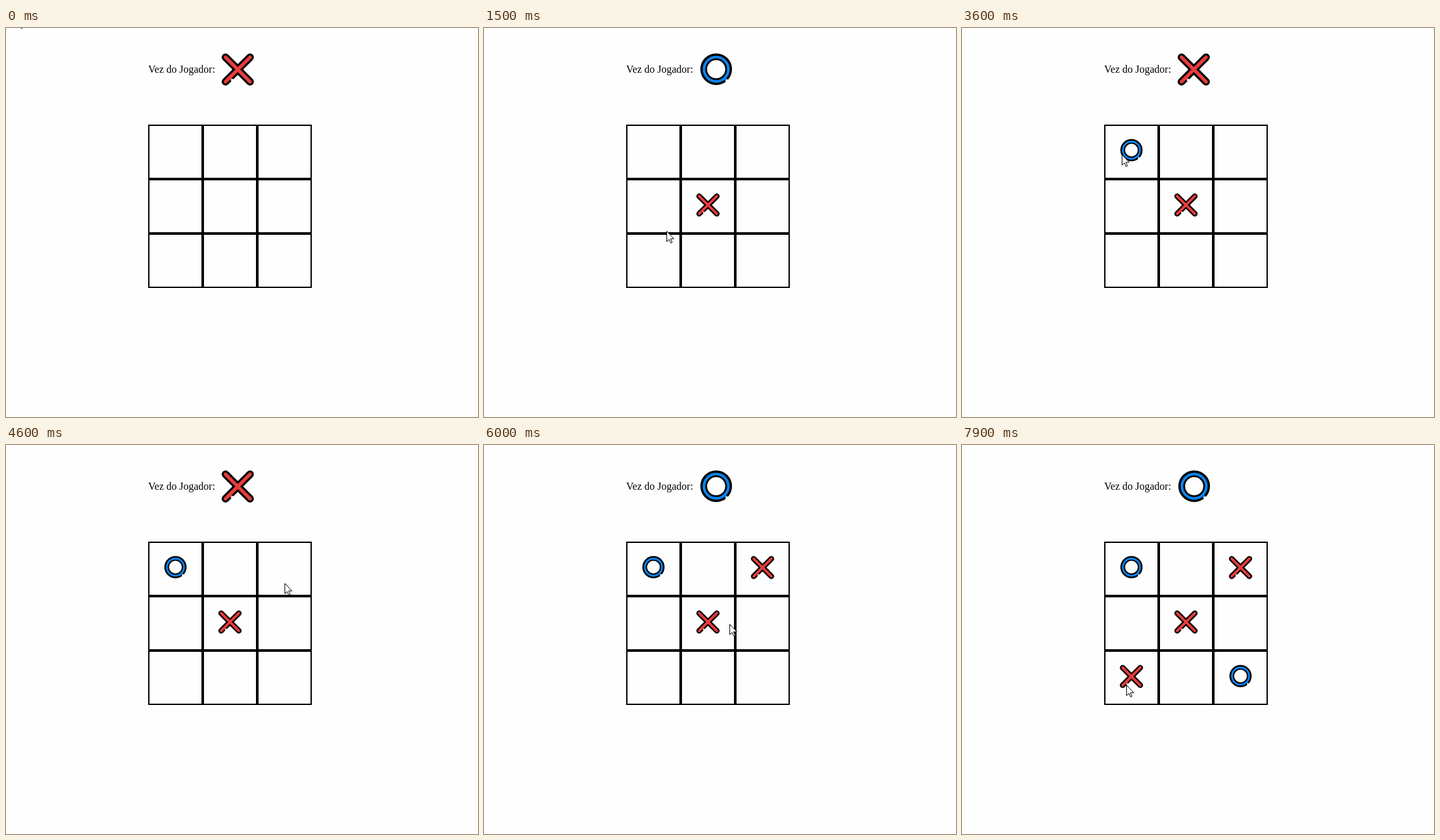
An HTML page with a canvas for the animation above (8000 ms loop, 727 by 600 pixels).

```html
<!DOCTYPE html>
<html lang="pt">
<head>
<meta charset="utf-8">
<title>Jogo da velha</title>
<style>
html, body { margin: 0; width: 100%; height: 100%; overflow: hidden; background: #fefefe; }
p { position: absolute; left: 219px; top: 55px; margin: 0; white-space: nowrap;
    font: 16px/18px "Liberation Serif", "Times New Roman", serif; color: #000; }
canvas { position: absolute; left: 0; top: 0; }
</style>
</head>
<body>
<p>Vez do Jogador:</p>
<canvas id="stage" width="727" height="600"></canvas>
<script>
const ctx = document.getElementById('stage').getContext('2d');
const LOOP = 8000, STEP = 100, CELL = 84;
const BLACK = '#000', RED = '#e83c3c', BLUE = '#0a84f0', PAPER = '#fefefe';

// Time of each click and the cell it fills; X and O alternate
const clicks = [[1000, 4], [3600, 0], [5400, 2], [7400, 8], [7900, 6]];

// Pointer strokes: arrival time, number of steps, end point
const strokes = [
  [800, 6, 339, 282],
  [1300, 2, 358, 294], [1500, 2, 281, 313], [1700, 2, 216, 270], [2000, 3, 239, 200],
  [2400, 3, 246, 195],
  [4000, 2, 433, 313], [4400, 3, 416, 248], [4600, 2, 429, 213],
  [5200, 2, 429, 211],
  [5600, 2, 414, 239], [6000, 3, 378, 276], [6200, 2, 350, 310], [6400, 2, 416, 338],
  [6700, 2, 434, 365],
  [7400, 1, 379, 354], [7900, 5, 253, 370]
];

function pointerAt(t) {
  const now = Math.floor(t / STEP) * STEP;
  let x = 17, y = -18;
  for (const [end, steps, toX, toY] of strokes) {
    const p = 1 - (end - now) / (steps * STEP);
    if (p <= 0) break;
    const ease = Math.sin(Math.min(p, 1) * Math.PI / 2);
    x += (toX - x) * ease;
    y += (toY - y) * ease;
  }
  return [Math.round(x), Math.round(y)];
}

function line(x1, y1, x2, y2, color, width, cap = 'round') {
  ctx.strokeStyle = color;
  ctx.lineWidth = width;
  ctx.lineCap = cap;
  ctx.beginPath();
  ctx.moveTo(x1, y1);
  ctx.lineTo(x2, y2);
  ctx.stroke();
}

function ring(r, color, width, from = 0, to = Math.PI * 2) {
  ctx.strokeStyle = color;
  ctx.lineWidth = width;
  ctx.lineCap = 'butt';
  ctx.beginPath();
  ctx.arc(0, 0, r, from, to);
  ctx.stroke();
}

function cross() {
  const a = 18.9;
  for (const [color, width] of [[BLACK, 11.8], [RED, 5.4]]) {
    line(-a, -a, a, a, color, width);
    line(a, -a, -a, a, color, width);
  }
  // break in the outline, partly filled by the red stroke
  line(-12.5, 12.5, -9.8, 15.2, RED, 3.6, 'butt');
  line(-9.8, 15.2, -7.8, 17.2, PAPER, 3.6, 'butt');
}

function nought() {
  ring(19.2, BLACK, 10.4);
  ring(18.8, BLUE, 4);
  ring(21.4, BLUE, 2.4, 0.74, 0.9);
  ring(23.6, PAPER, 2.4, 0.74, 0.9);
}

function mark(draw, x, y, scale) {
  ctx.save();
  ctx.translate(x, y);
  ctx.scale(scale, scale);
  draw();
  ctx.restore();
}

const cellAt = i => [220 + i % 3 * CELL, 150 + Math.floor(i / 3) * CELL];

function board() {
  ctx.strokeStyle = BLACK;
  ctx.lineWidth = 2;
  for (let i = 0; i < 9; i++) ctx.strokeRect(...cellAt(i), CELL - 2, CELL - 2);
}

const arrow = new Path2D('M.5 .5v16l3.6-3.4 2.6 5.6 2.2-1-2.5-5.6h5.1z');

function pointer(x, y) {
  ctx.save();
  ctx.translate(x, y);
  ctx.fillStyle = '#fff';
  ctx.fill(arrow);
  ctx.strokeStyle = BLACK;
  ctx.lineWidth = 1;
  ctx.stroke(arrow);
  ctx.restore();
}

function draw(t) {
  ctx.clearRect(0, 0, 727, 600);
  const played = clicks.filter(([time]) => time <= t);
  if (played.length % 2) mark(nought, 357.6, 63.6, 1);
  else mark(cross, 357, 64, 1);
  board();
  played.forEach(([, cell], turn) => {
    const [x, y] = cellAt(cell);
    if (turn % 2) mark(nought, x + 41, y + 38.4, 0.7);
    else mark(cross, x + 41, y + 39, 0.72);
  });
  pointer(...pointerAt(t));
}

const begin = performance.now();
function tick() {
  draw((performance.now() - begin) % LOOP);
  requestAnimationFrame(tick);
}
tick();
</script>
</body>
</html>
```
